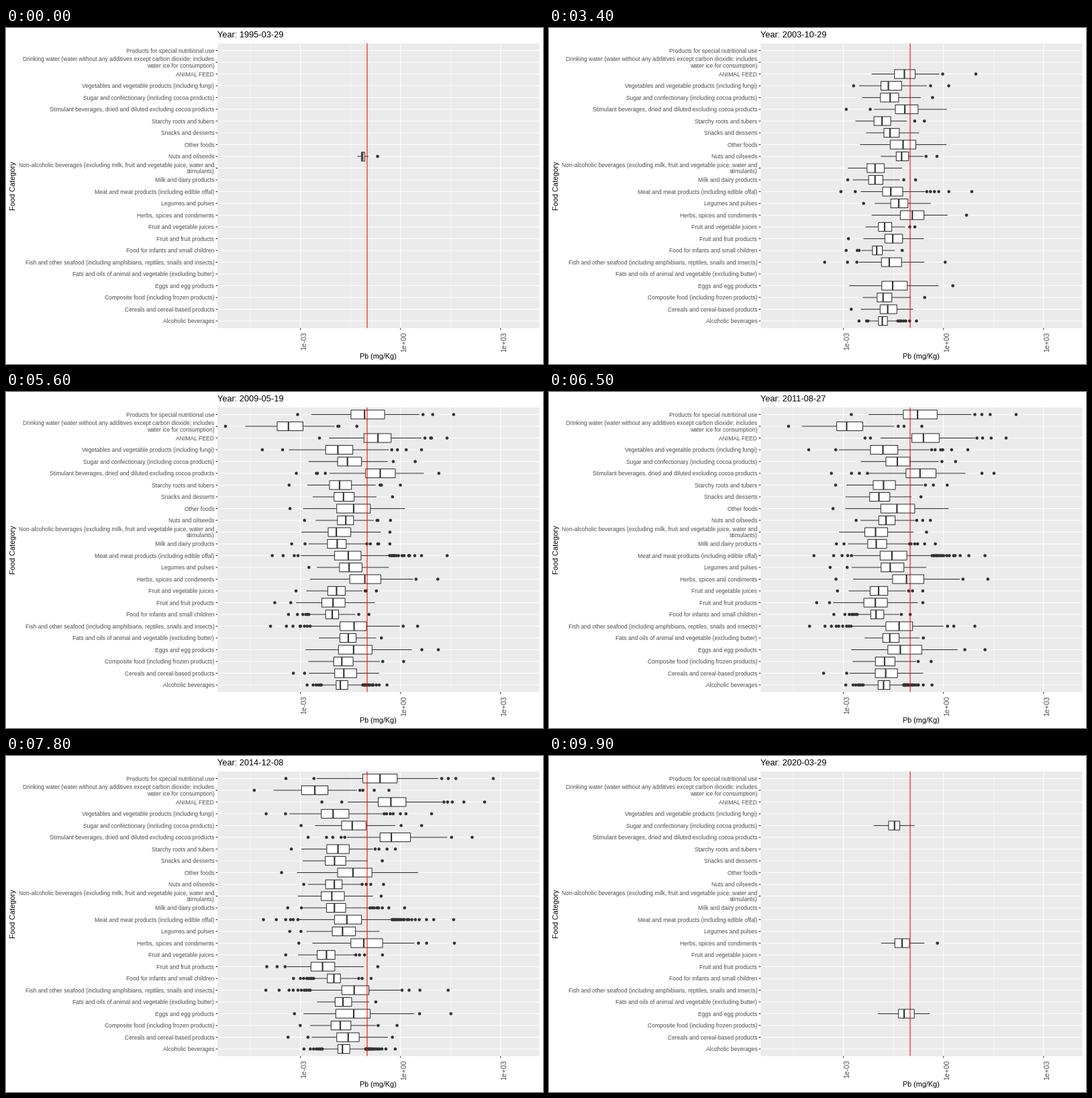
These frames come from a looping animation (800x500 px, 10 s). A matplotlib script:

```python
import numpy as np
import matplotlib.pyplot as plt
from matplotlib.animation import FuncAnimation
from matplotlib.collections import CircleCollection, LineCollection, PolyCollection
from matplotlib.patches import Rectangle

plt.rcParams.update({"font.family": "Liberation Sans",
                     "text.hinting": "force_autohint"})

PX = 0.72                      # points per pixel at 100 dpi
LEFT, RIGHT, TOP, BOTTOM = 315.3, 794.5, 23.0, 446.5
ROW = (BOTTOM - TOP) / 24.2
HALF = 0.375 * ROW
ZERO, DECADE = 587.7, 49.7     # x of 1 mg/kg and width of one decade
LINE = 1.07
INK, GREY = "#333333", "#4D4D4D"
FRAMES = 100
START = np.datetime64("1995-03-29")
DAYS = 9132

# Label, first year, median x in 2001 and in 2014, box width,
# outliers at the peak (negative: mostly on the low side).
CATEGORIES = [
    ("Products for special nutritional use", 2005, 505, 558, 52, 6),
    ("Drinking water (water without any additives except carbon dioxide; includes\n"
     "water ice for consumption)", 2008, 360, 465, 40, 5),
    ("ANIMAL FEED", 2003, 518, 572, 42, 7),
    ("Vegetables and vegetable products (including fungi)", 1999, 511, 494, 42, 9),
    ("Sugar and confectionary (including cocoa products)", 1999, 503, 517, 37, 3),
    ("Stimulant beverages, dried and diluted excluding cocoa products",
     1999, 520, 568, 46, -7),
    ("Starchy roots and tubers", 1999, 498, 500, 34, 5),
    ("Snacks and desserts", 2002, 515, 489, 31, 1),
    ("Other foods", 2003, 530, 518, 52, -1),
    ("Nuts and oilseeds", 1995, 531, 493, 25, 5),
    ("Non-alcoholic beverages (excluding milk, fruit and vegetable juice, water and\n"
     "stimulants)", 1999, 488, 484, 35, 1),
    ("Milk and dairy products", 1999, 488, 489, 29, 10),
    ("Meat and meat products (including edible offal)", 1999, 510, 509, 41, 25),
    ("Legumes and pulses", 1996, 524, 501, 35, -2),
    ("Herbs, spices and condiments", 2001, 540, 526, 48, 4),
    ("Fruit and vegetable juices", 1999, 505, 485, 27, 5),
    ("Fruit and fruit products", 1999, 517, 475, 36, -4),
    ("Food for infants and small children", 1999, 487, 488, 20, -12),
    ("Fish and other seafood (including amphibians, reptiles, snails and insects)",
     1999, 507, 522, 41, -14),
    ("Fats and oils of animal and vegetable (excluding butter)", 2004, 505, 506, 25, 1),
    ("Eggs and egg products", 2002, 505, 523, 52, 3),
    ("Composite food (including frozen products)", 1999, 498, 497, 30, 3),
    ("Cereals and cereal-based products", 1999, 502, 508, 34, -3),
    ("Alcoholic beverages", 1999, 493, 501, 18, 35),
]
LASTING = ("Sugar", "Herbs", "Eggs")     # still sampled in 2020
ROWS = [TOP + (0.6 + r) * ROW for r in range(len(CATEGORIES))]


def tail(rng, n, scale):
    """Distances of n outliers beyond a whisker, thinning outwards."""
    u = (np.arange(n) + rng.uniform(0.2, 0.8, n)) / max(n, 1)
    return -scale * np.log(1 - u)


def sample(rng, year, m0, m1, width, peak):
    """Box (low, q1, median, q3, high) and outliers of one category in one year."""
    w = width * np.interp(year, [1995, 2001, 2006, 2019, 2020], [0.2, 0.5, 0.95, 1, 0.45])
    mid = np.interp(year, [2001, 2014], [m0, m1]) + w * rng.normal(0, 0.12)
    q1 = mid - w * rng.uniform(0.35, 0.55)
    q3 = q1 + w
    lo = q1 - w * rng.uniform(0.9, 1.4)
    hi = q3 + w * rng.uniform(0.9, 1.4)

    growth = np.interp(year, [1995, 2001, 2006, 2014, 2019, 2020],
                       [0.2, 0.2, 0.4, 1, 1, 0.15])
    n = round(abs(peak) * growth)
    major = round(0.75 * n)
    n_low, n_high = (major, n - major) if peak < 0 else (n - major, major)
    low = lo - tail(rng, n_low, 0.6 * width)
    high = hi + tail(rng, n_high, 0.6 * width)
    return np.array([lo, q1, mid, q3, hi]), low, high


def history(row):
    label, first, *shape = CATEGORIES[row]
    rng = np.random.default_rng(40 + row)
    last = 2020 if label.startswith(LASTING) else 2019
    return {y: sample(rng, y, *shape) for y in range(first, last + 1)}


def resample(a, n):
    return a[np.round(np.linspace(0, len(a) - 1, n)).astype(int)]


def tween(a, b, k):
    if not len(a) or not len(b):
        return a if k < 0.5 else b
    n = max(len(a), len(b))
    return resample(a, n) * (1 - k) + resample(b, n) * k


def state(years, f):
    year, rest = divmod(25 * f, FRAMES - 1)
    k = rest / (FRAMES - 1)
    following = year + (rest > 0)
    a, b = years.get(1995 + year), years.get(1995 + following)
    if a is None or b is None:
        return None
    return [tween(p, q, k) for p, q in zip(a, b)]


HISTORY = [history(r) for r in range(len(CATEGORIES))]

fig = plt.figure(figsize=(8, 5), dpi=100, facecolor="white")
ax = fig.add_axes([0, 0, 1, 1])
ax.set(xlim=(0, 800), ylim=(500, 0))
ax.axis("off")


def lines(segs, color, width, z):
    c = LineCollection(segs, colors=color, linewidths=width * PX, zorder=z)
    c.set_snap(False)
    ax.add_collection(c, autolim=False)
    return c


def write(x, y, s, size, color="black", **kw):
    return ax.text(x, y, s, fontsize=size * PX, color=color, va="baseline",
                   rotation_mode="anchor", **kw)


def vline(x):
    return [(x, TOP), (x, BOTTOM)]


ax.add_patch(Rectangle((LEFT, TOP), RIGHT - LEFT, BOTTOM - TOP, fc="#EBEBEB", lw=0,
                       zorder=0, snap=False))
majors = [ZERO + DECADE * e for e in (-3, 0, 3)]
lines([vline(ZERO + DECADE * e) for e in (-4.5, -1.5, 1.5)], "white", LINE / 2, 1)
lines([[(LEFT, y), (RIGHT, y)] for y in ROWS], "white", LINE, 1.1)
lines([vline(x) for x in majors], "white", LINE, 1.1)
lines([[(LEFT - 2.75, y), (LEFT, y)] for y in ROWS], INK, LINE, 1.2)
lines([[(x, BOTTOM), (x, BOTTOM + 2.75)] for x in majors], INK, LINE, 1.2)
lines([vline(ZERO - DECADE)], "red", LINE, 6)

for y, (text, *_) in zip(ROWS, CATEGORIES):
    parts = text.split("\n")
    for i, part in enumerate(parts):
        shift = (i - (len(parts) - 1) / 2) * 9.5
        write(310.3, y + shift + 3.1, part, 8.55, GREY, ha="right")
for x, text in zip(majors, ("1e-03", "1e+00", "1e+03")):
    write(x + 8.5, 452, text, 10.6, GREY, ha="right", rotation=90)
write((LEFT + RIGHT) / 2 - 0.5, 492, "Pb (mg/Kg)", 10.7, ha="center")
write(13.6, (TOP + BOTTOM) / 2, "Food Category", 11, ha="center", rotation=90)
title = write(LEFT, 14, "", 12.7, ha="left")

dots = CircleCollection([np.pi * (2.3 * PX) ** 2], offsets=np.empty((0, 2)),
                        offset_transform=ax.transData, facecolors=[INK, INK],
                        edgecolors="none", linewidths=0, zorder=2)
ax.add_collection(dots, autolim=False)
whiskers = lines([], INK, LINE, 3)
boxes = PolyCollection([], facecolors="white", edgecolors=INK, linewidths=LINE * PX,
                       joinstyle="miter", zorder=4)
boxes.set_snap(False)
ax.add_collection(boxes, autolim=False)
medians = lines([], INK, 2 * LINE, 5)


def draw(f):
    title.set_text(f"Year: {START + np.timedelta64(DAYS * f // (FRAMES - 1), 'D')}")
    pts, whisk, rects, mids = [], [], [], []
    for y, years in zip(ROWS, HISTORY):
        now = state(years, f)
        if now is None:
            continue
        (lo, q1, mid, q3, hi), low, high = now
        up, down = y - HALF, y + HALF
        pts += [(x, y) for x in (*low, *high)]
        whisk += [[(lo, y), (q1, y)], [(q3, y), (hi, y)]]
        rects.append([(q1, up), (q3, up), (q3, down), (q1, down)])
        mids.append([(mid, up), (mid, down)])
    dots.set_offsets(np.array(pts).reshape(-1, 2))
    whiskers.set_segments(whisk)
    boxes.set_verts(rects)
    medians.set_segments(mids)
    return title, dots, whiskers, boxes, medians


anim = FuncAnimation(fig, draw, frames=FRAMES, interval=100, repeat=True,
                     repeat_delay=0, blit=False)
plt.show()
```
